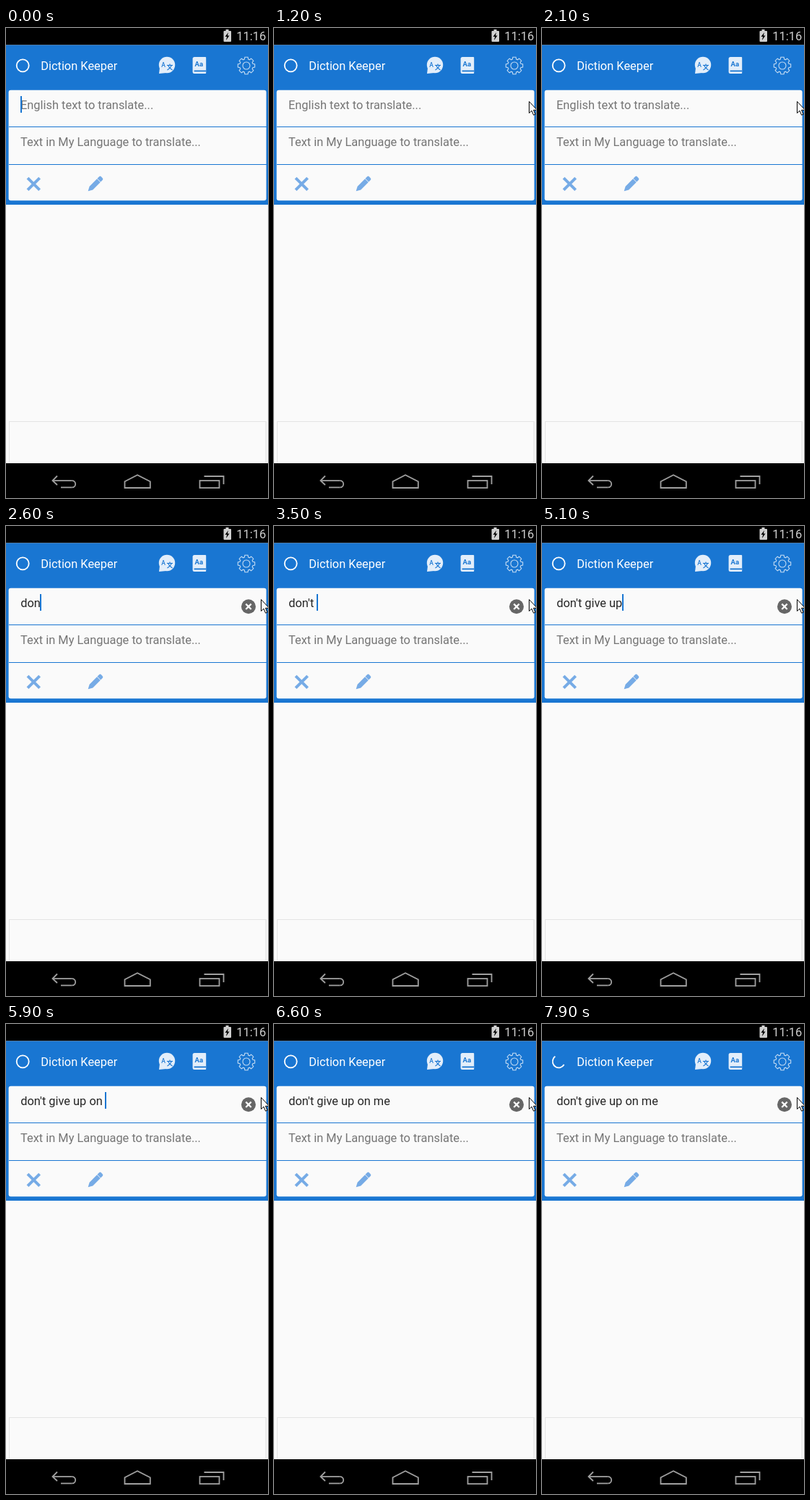
These frames come from a looping animation (363x649 px, 8000 ms). An HTML page with a canvas:

```html
<!DOCTYPE html>
<html lang="en">
<head>
<meta charset="utf-8">
<title>Translator screen</title>
<style>
html, body { margin: 0; width: 363px; height: 649px; overflow: hidden; background: #fafafa; }
canvas { display: block; width: 363px; height: 649px; }
</style>
</head>
<body>
<canvas id="stage"></canvas>
<script>
const W = 363, H = 649, LOOP = 8000, STEP = 100, TAU = Math.PI * 2;
const BLUE = '#1976d2', PAPER = '#fafafa', PALE = '#e3eefa', SOFT = '#76abe6', HINT = '#757575';
const FONT = 'Roboto, "Open Sans", sans-serif';
const PHRASE = "don't give up on me";
// typing rhythm: [letter index, time], even pace in between
const PACE = [[0, 2150], [2, 2590], [4, 3400], [5, 3460], [8, 4312], [18, 6187]];
const BLINK = 450, SPIN_START = 7400, SPIN_SPAN = 500;

const canvas = document.getElementById('stage');
const c = canvas.getContext('2d');
const dpr = window.devicePixelRatio || 1;
canvas.width = W * dpr;
canvas.height = H * dpr;

const ramp = (t, from, span) => Math.min(1, Math.max(0, (t - from) / span));

function along(points, x) {
  const i = Math.max(1, points.findIndex(p => p[0] >= x));
  const [x0, y0] = points[i - 1], [x1, y1] = points[i];
  return y0 + (y1 - y0) * (x - x0) / (x1 - x0);
}

const presses = [...PHRASE].map((_, i) => along(PACE, i));

function box(x, y, w, h, color) {
  c.fillStyle = color;
  c.fillRect(x, y, w, h);
}

function trace(points, close) {
  c.beginPath();
  points.forEach(([x, y]) => c.lineTo(x, y));
  if (close) c.closePath();
}

function fillPoly(points, color) {
  trace(points, true);
  c.fillStyle = color;
  c.fill();
}

function line(points, color, width, close) {
  trace(points, close);
  c.strokeStyle = color;
  c.lineWidth = width;
  c.stroke();
}

function round(x, y, w, h, r, color) {
  c.beginPath();
  c.roundRect(x, y, w, h, r);
  c.fillStyle = color;
  c.fill();
}

function disc(x, y, r, color) {
  c.beginPath();
  c.arc(x, y, r, 0, TAU);
  c.fillStyle = color;
  c.fill();
}

function ring(x, y, r, color, width, from = 0, to = TAU) {
  c.beginPath();
  c.arc(x, y, r, from, to);
  c.strokeStyle = color;
  c.lineWidth = width;
  c.stroke();
}

function cross(x, y, r, color, width) {
  line([[x - r, y - r], [x + r, y + r]], color, width);
  line([[x + r, y - r], [x - r, y + r]], color, width);
}

function text(str, x, y, color, size = 16.4, weight = 400) {
  c.font = `${weight} ${size}px ${FONT}`;
  c.fillStyle = color;
  c.fillText(str, x, y);
}

function statusBar() {
  box(0, 0, W, 23.5, '#000');
  box(304.5, 2, 4, 3, '#d0d0d0');
  round(301.5, 4, 10.5, 15, 1, '#d0d0d0');
  fillPoly([[308, 6], [303.5, 12], [306.1, 12], [304.9, 17], [309.5, 10.5], [306.9, 10.5]], '#000');
  text('11:16', 319.2, 17, '#cfcfcf', 16.5);
}

function bubbleIcon() {
  disc(223, 51, 11.2, PALE);
  fillPoly([[213, 55], [212, 63], [222, 62]], PALE);
  text('A', 215.3, 53.5, BLUE, 8.5, 500);
  line([[223, 51.5], [231, 51.5]], BLUE, 1.1);
  line([[227, 49.5], [227, 51.5]], BLUE, 1.1);
  line([[229.3, 51.5], [227.5, 55], [223.5, 58]], BLUE, 1.1);
  line([[224.7, 51.5], [226.5, 55], [230.5, 58]], BLUE, 1.1);
}

function bookIcon() {
  round(258.6, 40, 18.6, 23, [2.5, 1, 1, 2.5], PALE);
  box(260.6, 58.5, 16.6, 1.8, BLUE);
  text('Aa', 261.6, 53, BLUE, 9.5, 700);
}

function gearIcon() {
  const tint = 'rgba(255,255,255,.75)', teeth = 8, pts = [];
  for (let i = 0; i < teeth * 4; i++) {
    const side = i % 4, outer = side === 1 || side === 2;
    const a = (Math.floor(i / 4) / teeth) * TAU + (side < 2 ? -1 : 1) * (outer ? 0.18 : 0.29);
    const r = outer ? 11.9 : 9.3;
    pts.push([333 + r * Math.sin(a), 52 - r * Math.cos(a)]);
  }
  line(pts, tint, 1.1, true);
  ring(333, 52, 5, tint, 1.1);
}

function pencilIcon() {
  c.save();
  c.translate(113.7, 225.3);
  c.rotate(-Math.PI / 4);
  fillPoly([[0, 0], [6, -3.3], [20.8, -3.3], [20.8, 3.3], [6, 3.3]], SOFT);
  round(21.4, -3.3, 5.6, 6.6, [0, 2, 2, 0], SOFT);
  c.restore();
}

function header() {
  box(0, 23.5, W, 220.5, BLUE);
  text('Diction Keeper', 48.2, 58, '#fff');
  bubbleIcon();
  bookIcon();
  gearIcon();
  round(3.6, 85.7, 357, 152.6, 3, PAPER);
  box(4, 136, 357, 1, BLUE);
  box(4, 188, 357, 1, BLUE);
  text('Text in My Language to translate...', 20, 163.3, HINT);
  cross(38.3, 215.4, 8.3, SOFT, 4);
  pencilIcon();
}

function bottomCard() {
  box(4, 543, 357, 58, '#e4e4e4');
  box(5, 544, 354.5, 57, PAPER);
}

function navBar() {
  const gray = '#a0a0a0', width = 1.8;
  box(0, 601, W, 48, '#000');
  line([[71, 618.5], [64.5, 625], [71, 631]], gray, width);
  line([[64.5, 625], [91.5, 625]], gray, width);
  ring(91.5, 629.7, 4.7, gray, width, -TAU / 4, TAU / 4);
  line([[91.5, 634.4], [76, 634.4]], gray, width);
  line([[182, 617.3], [164.5, 626.3], [164.5, 635], [199.8, 635], [199.8, 626.3]], gray, width, true);
  c.strokeRect(268.5, 625, 27, 10);
  line([[274.5, 619], [301.5, 619], [301.5, 630]], gray, width);
}

function spinner(t) {
  const p = ramp(t, SPIN_START, SPIN_SPAN);
  const head = (180 + 55 * p) / 360 * TAU;
  const sweep = (360 - 155 * p ** 1.5) / 360 * TAU;
  ring(23.2, 51.8, 8.5, '#fff', 1.8, head - sweep, head);
}

function field(t) {
  const count = presses.filter(p => p <= t).length;
  const typed = PHRASE.slice(0, count);
  if (count) {
    text(typed, 20.2, 111.8, '#262626');
    disc(336, 111.3, 10, '#666');
    cross(336, 111.3, 3.7, '#fff', 2.2);
  } else {
    text('English text to translate...', 20, 111.8, HINT);
  }
  // each key press restarts the caret blink
  const since = t - (count ? presses[count - 1] : -100) + 50;
  if (Math.floor(since / BLINK) % 2 === 0) {
    box(Math.floor(20.3 + c.measureText(typed).width), 94, 2, 23, BLUE);
  }
}

function pointer(t) {
  if (t < 100) return;
  const enter = ramp(t, 100, 200), leave = ramp(t, 900, 300);
  const x = 297 - 14 * enter + 70 * leave;
  const y = 91 + 19 * enter - 9 * leave;
  const shape = [[0, 0], [0, 16], [3.5, 12.7], [6.1, 18.7], [8.5, 17.7], [6, 11.8], [11, 11.8]]
    .map(([dx, dy]) => [x + dx + 0.5, y + dy + 0.5]);
  fillPoly(shape, '#fff');
  line(shape, '#000', 1, true);
}

function draw(t) {
  c.setTransform(dpr, 0, 0, dpr, 0, 0);
  box(0, 0, W, H, PAPER);
  statusBar();
  header();
  bottomCard();
  navBar();
  spinner(t);
  field(t);
  pointer(t);
}

const start = performance.now();
function tick() {
  const t = (performance.now() - start) % LOOP;
  draw(Math.floor(t / STEP) * STEP);
  requestAnimationFrame(tick);
}
tick();
</script>
</body>
</html>
```
